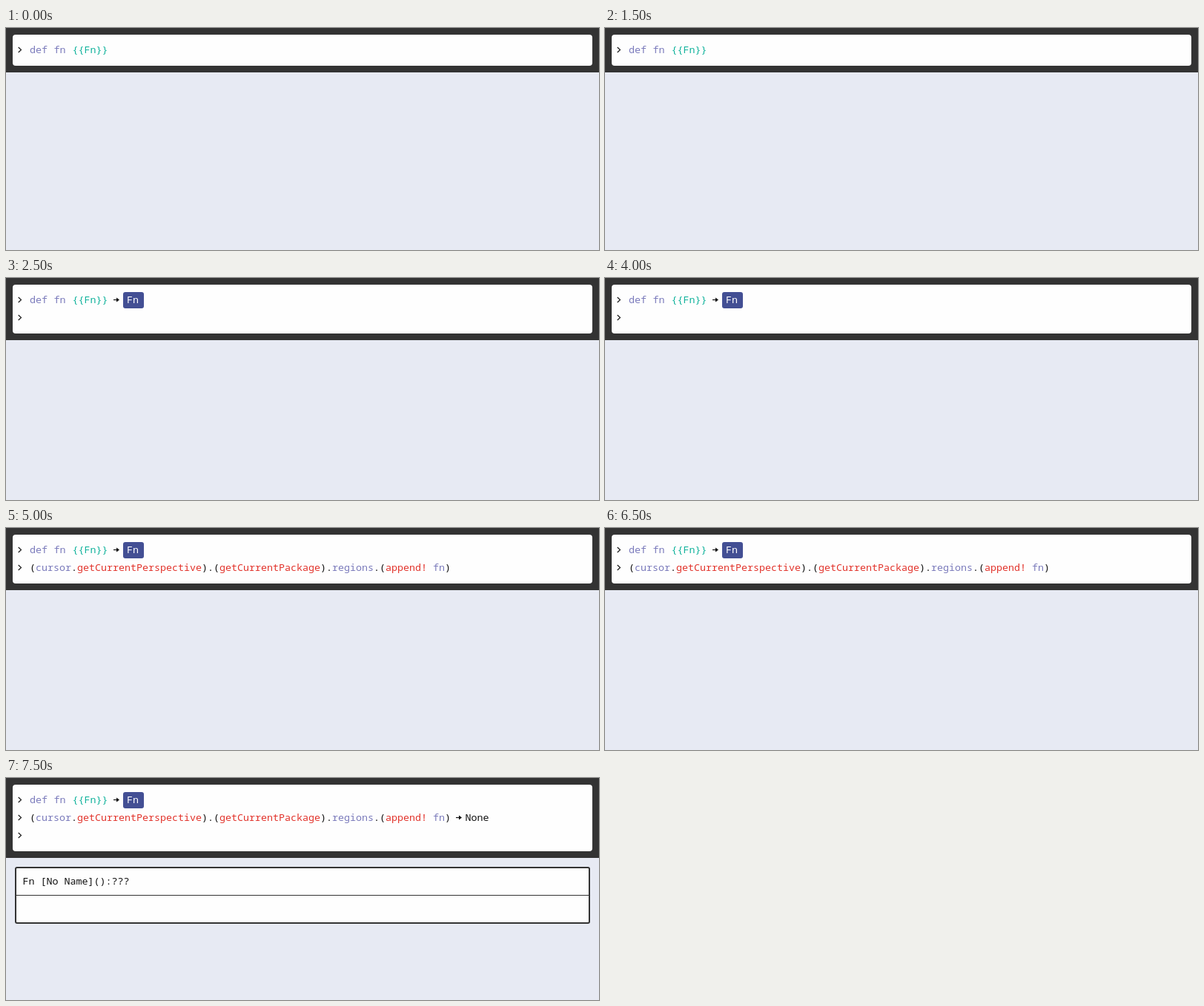
An HTML page with a canvas for the animation above (10000 ms loop, 800 by 300 pixels).

```html
<!DOCTYPE html>
<html lang="en">
<head>
<meta charset="utf-8">
<title>Console</title>
<style>
html, body { margin: 0; width: 100%; height: 100%; overflow: hidden; background: #e7eaf3; }
canvas { display: block; }
</style>
</head>
<body>
<canvas id="stage" width="800" height="300"></canvas>
<script>
const ctx = document.getElementById('stage').getContext('2d');
const STEP = 2500, CELL = 8, LINE = 24;
const INK = '#111', BAR = '#333', PAPER = '#fefefe', NAME = '#7a7abb', TYPE = '#0fb29b', CALL = '#e2332b', BADGE = '#434f94';

function box(x, y, w, h, r, color) {
  ctx.fillStyle = color;
  ctx.beginPath();
  ctx.roundRect(x, y, w, h, r);
  ctx.fill();
}

function text(str, x, y, color = INK) {
  ctx.fillStyle = color;
  ctx.fillText(str, x, y);
}

// Draws [text, color] pairs one after another on the character grid.
function run(parts, x, y) {
  for (const [str, color] of parts) {
    text(str, x, y, color);
    x += str.length * CELL;
  }
}

function stroke(points, width) {
  ctx.strokeStyle = INK;
  ctx.lineWidth = width;
  ctx.beginPath();
  points.forEach(([x, y]) => ctx.lineTo(x, y));
  ctx.stroke();
}

function prompt(row) {
  const y = 29.5 + row * LINE;
  stroke([[16.7, y - 3.5], [20.5, y], [16.7, y + 3.5]], 1.1);
}

function arrow(x, y) {
  stroke([[x, y], [x + 6, y]], 1.2);
  ctx.fillStyle = INK;
  ctx.beginPath();
  ctx.moveTo(x + 4, y - 3);
  ctx.lineTo(x + 8, y);
  ctx.lineTo(x + 4, y + 3);
  ctx.fill();
}

function drawConsole(rows) {
  const h = 36 + rows * LINE;
  box(0, 0, 800, h, 0, BAR);
  box(9, 9, 782, h - 18, 4, PAPER);
  for (let i = 0; i < rows; i++) prompt(i);
}

function drawPanel() {
  box(12, 120, 776, 77, 3, BAR);
  box(14, 122, 772, 73, 1, PAPER);
  box(14, 158, 772, 1, 0, BAR);
  text('Fn [No Name]():???', 22.5, 144);
}

function draw(step) {
  ctx.fillStyle = '#e7eaf3';
  ctx.fillRect(0, 0, 800, 300);
  ctx.font = '300 13.333px "Noto Sans Mono", monospace';
  drawConsole([1, 2, 2, 3][step]);

  text('def', 32, 34, NAME);
  text('fn', 64.5, 34, NAME);
  text('{{Fn}}', 89.5, 34, TYPE);
  if (step > 0) {
    arrow(145, 29.5);
    box(158, 19, 28, 22, 3, BADGE);
    text('Fn', 163, 34, '#fff');
  }
  if (step > 1) {
    run([
      ['(', INK], ['cursor', NAME], ['.', INK], ['getCurrentPerspective', CALL],
      [').(', INK], ['getCurrentPackage', CALL], [').', INK], ['regions', NAME],
      ['.(', INK], ['append!', CALL], [' fn', NAME], [')', INK]
    ], 32, 58);
  }
  if (step > 2) {
    arrow(607, 53.5);
    text('None', 619.5, 58);
    drawPanel();
  }
}

function tick() {
  draw(Math.floor(performance.now() / STEP) % 4);
  requestAnimationFrame(tick);
}
tick();
</script>
</body>
</html>
```
